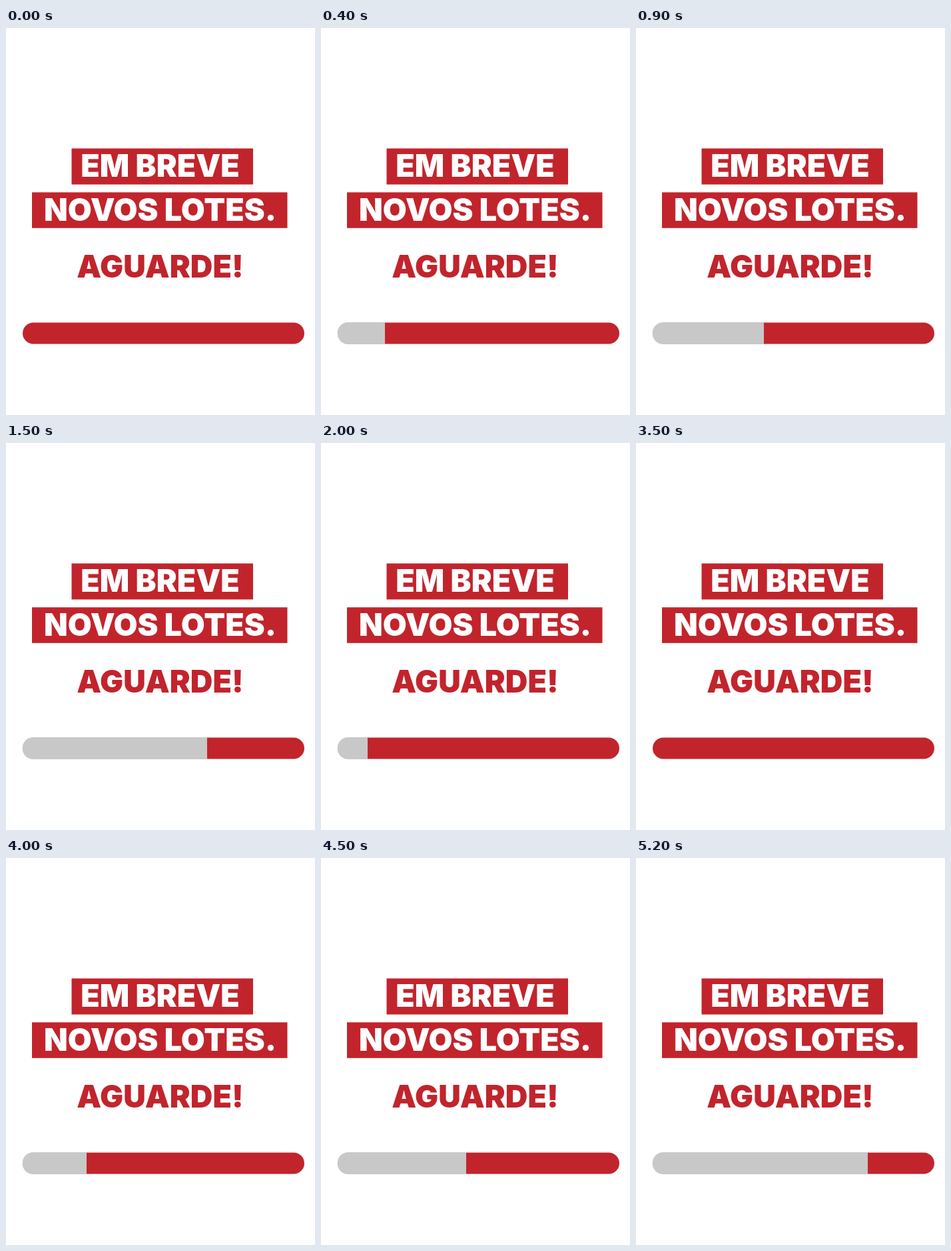
Write an HTML page with a canvas that moves like this. It is 464 px wide and 580 px high and loops after 5300 ms.

```html
<!DOCTYPE html>
<html lang="pt">
<head>
<meta charset="utf-8">
<title>Em breve</title>
<style>
  html, body { margin: 0; width: 100%; height: 100%; overflow: hidden; background: #fff; }
  canvas { display: block; }
</style>
</head>
<body>
<canvas id="stage" width="464" height="580"></canvas>
<script>
const ctx = document.getElementById("stage").getContext("2d");
const RED = "#c2242c", GREY = "#c8c8c8", WHITE = "#fff";
const LOOP = 5300, TICK = 100;
const BAR = { x: 24.5, y: 441, w: 424, h: 33 };

// The bar fills in small steps, slightly offset from the picture ticks.
const STEP_MS = 33.95, STEPS = 51, STEP_PX = 6.46;

function rect(color, x, y, w, h) {
  ctx.fillStyle = color;
  ctx.fillRect(x, y, w, h);
}

function line(text, color, center, baseline) {
  ctx.fillStyle = color;
  ctx.fillText(text, center, baseline);
}

function fillWidth(time) {
  const tick = Math.floor(time / TICK) * TICK;
  const step = Math.max(0, Math.floor(tick / STEP_MS - 0.5)) % STEPS;
  return step * STEP_PX;
}

// A pill cut to the span from x to x + w.
function pillPart(color, inset, x, w) {
  const h = BAR.h - 2 * inset;
  ctx.save();
  ctx.beginPath();
  ctx.roundRect(BAR.x + inset, BAR.y + inset, BAR.w - 2 * inset, h, h / 2);
  ctx.clip();
  rect(color, x, BAR.y, w, BAR.h);
  ctx.restore();
}

function drawBar(time) {
  const edge = Math.round(BAR.x + fillWidth(time));
  pillPart(RED, 0.5, edge, BAR.x + BAR.w - edge);
  if (edge > BAR.x + 1) pillPart(GREY, 0, BAR.x, edge - BAR.x);
}

function draw(time) {
  rect(WHITE, 0, 0, 464, 580);
  ctx.font = "900 46.5px Inter, sans-serif";
  ctx.textAlign = "center";
  rect(RED, 98.5, 180.5, 272.5, 54);
  rect(RED, 39, 246.3, 383.5, 53.5);
  line("EM BREVE", WHITE, 231.5, 223);
  line("NOVOS LOTES.", WHITE, 231.5, 289);
  line("AGUARDE!", RED, 231.5, 374);
  drawBar(time);
}

const start = performance.now();
function frame() {
  draw((performance.now() - start) % LOOP);
  requestAnimationFrame(frame);
}
frame();
</script>
</body>
</html>
```
